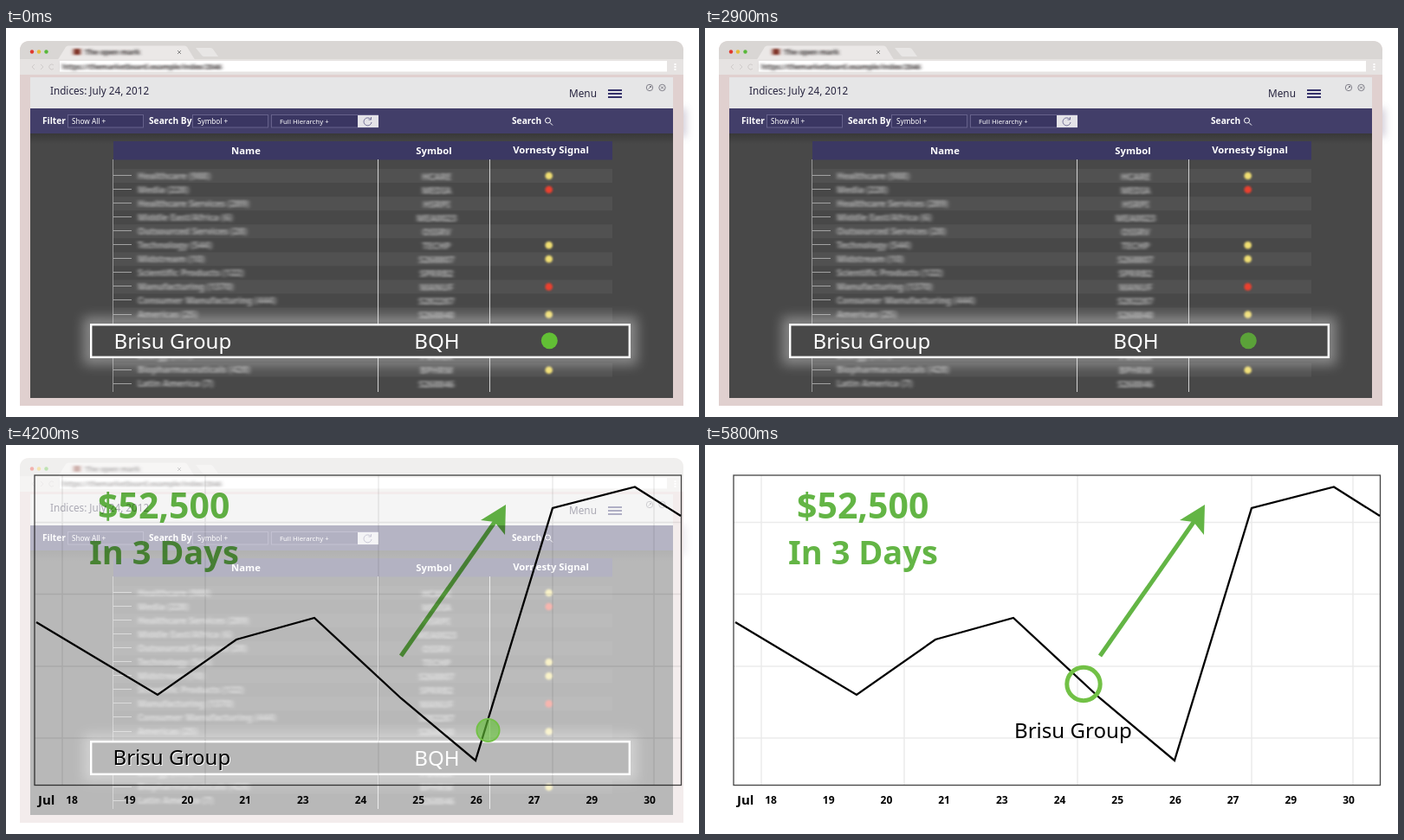
Animation of 800x450 px, one loop 5.9 s. Source, as an HTML page:

```html
<!DOCTYPE html>
<html lang="en">
<head>
<meta charset="utf-8">
<title>Signal to chart</title>
<style>
  html, body { margin: 0; width: 100%; height: 100%; overflow: hidden; background: #fff; }
  svg { display: block; width: 800px; height: 450px; font-family: "Noto Sans", "Open Sans", sans-serif; }
  #chart { mix-blend-mode: multiply; }
  .bold { font-weight: 700; }
  .semi { font-weight: 600; }
  .mid { text-anchor: middle; }
  .line { fill: none; }
</style>
</head>
<body>
<svg viewBox="0 0 800 450">
  <defs>
    <filter id="smear" x="-10%" y="-10%" width="120%" height="120%"><feGaussianBlur stdDeviation="2 0.8"/></filter>
    <filter id="soft" x="-50%" y="-50%" width="200%" height="200%"><feGaussianBlur stdDeviation="1"/></filter>
    <filter id="glow" filterUnits="userSpaceOnUse" x="50" y="290" width="720" height="140"><feGaussianBlur stdDeviation="7"/></filter>
    <filter id="shade" filterUnits="userSpaceOnUse" x="740" y="70" width="60" height="80"><feGaussianBlur stdDeviation="5"/></filter>
    <filter id="motion" x="-20%" y="-20%" width="140%" height="140%"><feGaussianBlur id="motionBlur" stdDeviation="0 0"/></filter>
    <linearGradient id="fall" x2="0" y2="1">
      <stop stop-color="#000" stop-opacity=".22"/><stop offset="1" stop-color="#000" stop-opacity="0"/>
    </linearGradient>
    <clipPath id="pane"><rect x="28" y="57" width="742" height="371"/></clipPath>
  </defs>
  <rect width="800" height="450" fill="#fff"/>

  <g id="board">
    <!-- browser window -->
    <rect x="768" y="93" width="17" height="33" fill="#6a5a80" opacity=".3" filter="url(#shade)"/>
    <path d="M16 437V27Q16 15 28 15H770Q782 15 782 27V437Z" fill="#e0d0cf"/>
    <path d="M16 36V27Q16 15 28 15H770Q782 15 782 27V36Z" fill="#d9d6d4"/>
    <rect x="16" y="36" width="766" height="18" fill="#e6e3e2"/>
    <circle cx="30" cy="27.5" r="2.2" fill="#df3a2e"/>
    <circle cx="38" cy="27.5" r="2.2" fill="#e5bd35"/>
    <circle cx="46.500" cy="27.5" r="2.2" fill="#58b83a"/>
    <path d="M60 36.500L69 22Q70 20.500 72 20.500H206Q208 20.500 209 22L218 36.500Z" fill="#ebe8e7"/>
    <path d="M219 23H236Q238 23 239 24.500L245 33H229Q227 33 226 31.500Z" fill="#e8e6e5"/>
    <path class="line" d="M198 26l4 4m0-4l-4 4" stroke="#888"/>
    <path class="line" d="M33 42l-3 3 3 3M40 42l3 3-3 3M55 43a3 3 0 1 0 0 4" stroke="#cfcbca"/>
    <rect x="62" y="38" width="701" height="12.500" fill="#fff"/>
    <path d="M772.500 41v8" stroke="#fff" stroke-width="2" stroke-dasharray="2 1"/>
    <g filter="url(#smear)" fill="#3c3636">
      <rect x="78" y="24" width="8" height="7" fill="#7a2a1c"/>
      <text class="bold" x="91" y="31" font-size="8.500">The open mark</text>
      <text class="bold" x="65" y="48" font-size="8.200">https://themarketboard.example/index/2046</text>
    </g>

    <!-- page header -->
    <rect x="28" y="57" width="742" height="36" fill="#e6e6e7"/>
    <rect x="28" y="93" width="742" height="335" fill="#484848"/>
    <rect x="28" y="122" width="742" height="12" fill="url(#fall)"/>
    <rect x="28" y="93" width="742" height="29" fill="#423e69"/>
    <g fill="#27243f">
      <text x="51" y="77" font-size="11.700">Indices: July 24, 2012</text>
      <text x="650" y="80" font-size="11.800">Menu</text>
    </g>
    <path d="M695 72h16m-16 4h16m-16 4h16" stroke="#35316a" stroke-width="2"/>
    <g class="line" stroke="#77757f" stroke-width=".9">
      <circle cx="743" cy="69" r="3.700"/><circle cx="757.500" cy="69" r="3.700"/>
      <path d="M741.500 70.500l3-3m-1.500 0h1.500v1.500M756 67.500l3 3m0-3l-3 3"/>
    </g>
    <g fill="#3a3662" stroke="#6a6690" stroke-width=".9">
      <rect x="71.500" y="100.500" width="87" height="14.500"/>
      <rect x="215.500" y="100.500" width="87" height="14.500"/>
      <rect x="306.500" y="100.500" width="123" height="14.500"/>
    </g>
    <rect x="406" y="101" width="24" height="14" fill="#e4e3e8"/>
    <path class="line" d="M421 105.500a4.500 4.500 0 1 0 1 3.500M421.500 103v3h-3" stroke="#77749a"/>
    <g fill="#fff">
      <g class="semi" font-size="10.200">
        <text x="42" y="111">Filter</text>
        <text x="165" y="111">Search By</text>
        <text x="584" y="111">Search</text>
      </g>
      <g font-size="8.200">
        <text x="76" y="110.500">Show All +</text>
        <text x="221" y="110.500">Symbol +</text>
        <text x="316" y="110.500" font-size="7.800">Full Hierarchy +</text>
      </g>
    </g>
    <path class="line" d="M628 109.500l3 3M628.500 107a3 3 0 1 0-6 0a3 3 0 1 0 6 0" stroke="#fff"/>

    <!-- table -->
    <g id="stripes" fill="#515151"></g>
    <rect x="124" y="131" width="576" height="21.500" fill="#3b3863"/>
    <g class="bold mid" fill="#fff" font-size="11.300">
      <text x="277" y="146">Name</text>
      <text x="494" y="146">Symbol</text>
      <text x="629" y="145">Vornesty Signal</text>
    </g>
    <path d="M123.500 152V421" stroke="#979797"/>
    <path d="M429.500 152V421M558.500 152V421" stroke="#d2d2d2"/>
    <g id="dashes" stroke="#a2a2a2"></g>
    <g id="rows" class="semi" fill="#b4b4b4" font-size="10.300" filter="url(#smear)"></g>
    <g id="lights" filter="url(#soft)"></g>

    <!-- picked row -->
    <g clip-path="url(#pane)">
      <rect x="98" y="343" width="622" height="38" class="line" stroke="#fff" stroke-width="17" opacity=".36" filter="url(#glow)"/>
    </g>
    <rect x="98.200" y="343.200" width="621.600" height="37.600" fill="#484848" stroke="#fff" stroke-width="2.400"/>
    <g fill="#fff" font-size="24.100">
      <text x="124.500" y="370.500">Brisu Group</text>
      <text class="mid" x="497.500" y="370.500">BQH</text>
    </g>
  </g>

  <g id="chart">
    <path class="line" d="M65 35V393M230 35V393M430 35V393M631 35V393M748 35V393M33 89.500H779M33 172.500H779M33 256H779M33 339H779" stroke="#ebebeb" stroke-width="1.500"/>
    <rect class="line" x="33" y="35" width="746.500" height="358.500" stroke="#444" stroke-width="1.300"/>
    <polyline class="line" points="35,205 175,289 266,225 356,200 456,293 542,365 631,73 726,48.500 779,82" stroke="#000" stroke-width="2.300"/>
    <g fill="#63b545" class="bold">
      <text x="106" y="85" font-size="41">$52,500</text>
      <text x="96" y="138" font-size="38">In 3 Days</text>
      <path d="M577 69L548 87L564 89L576 104Z"/>
    </g>
    <path d="M456 244L567 85" stroke="#63b545" stroke-width="5"/>
    <text class="semi" x="37" y="416" font-size="15">Jul</text>
    <g id="days" class="semi mid" font-size="12"></g>
  </g>

  <text id="label" font-size="24.100">Brisu Group</text>
  <circle id="dot" fill="#62bf35" stroke="#72c146"/>
</svg>

<script>
const LOOP = 5900, STEP = 100;
const $ = id => document.getElementById(id);

function add(parent, tag, attrs, text = "") {
  const el = document.createElementNS("http://www.w3.org/2000/svg", tag);
  set(el, attrs);
  el.textContent = text;
  return $(parent).appendChild(el);
}
function set(el, attrs) {
  for (const key in attrs) el.setAttribute(key, attrs[key]);
}

// name, symbol, signal light (y = yellow, r = red)
const table = [
  ["Healthcare (988)", "HCARE", "y"],
  ["Media (228)", "MEDIA", "r"],
  ["Healthcare Services (289)", "HSRPI"],
  ["Middle East/Africa (6)", "MEA0023"],
  ["Outsourced Services (28)", "OSSRV"],
  ["Technology (544)", "TECHP", "y"],
  ["Midstream (10)", "S268807", "y"],
  ["Scientific Products (122)", "SPRRB2"],
  ["Manufacturing (1370)", "MANUF", "r"],
  ["Consumer Manufacturing (444)", "S282287"],
  ["Americas (25)", "S268840", "y"],
  ["Medical Facilities (82)", "MEDFC"],
  null,
  ["Energy (417)", "POWER"],
  ["Biopharmaceuticals (428)", "BPHRM", "y"],
  ["Latin America (7)", "S268846"]
];
const lightColor = { y: "#f0de72", r: "#ea3f2d" };

table.forEach((row, i) => {
  const y = 171 + i * 16.05;
  if (i % 2 === 0) add("stripes", "rect", { x: 124, y: y - 8, width: 576, height: 16 });
  if (!row) return;
  const [name, symbol, light] = row;
  add("dashes", "path", { d: `M124 ${Math.round(y) - .5}H145` });
  add("rows", "text", { x: 152, y: y + 3.5 }, name);
  add("rows", "text", { x: 497, y: y + 4.5, class: "mid" }, symbol);
  if (light) add("lights", "circle", { cx: 626.7, cy: y, r: 4.3, fill: lightColor[light] });
});
for (let d = 18; d <= 30; d++) {
  if (d > 28 && d < 29) continue;
}
"18 19 20 21 22 24 25 26 27 29 30".replace("22", "23").split(" ").forEach((day, i) =>
  add("days", "text", { x: 76 + i * 66.7, y: 415 }, day === "23" ? "23" : day));

const clamp = x => Math.min(1, Math.max(0, x));
const ramp = (t, from, to) => clamp((t - from) / (to - from));
const mix = (a, b, p) => a + (b - a) * p;

// constant speed with a short run-up and run-out, each a share k of the time
function glide(x, k) {
  const v = 1 / (1 - k);
  if (x < k) return v * x * x / (2 * k);
  if (x > 1 - k) return 1 - v * (1 - x) ** 2 / (2 * k);
  return v * (x - k / 2);
}

function pulse(t) {
  if (t > 3312) return mix(.22, 1, ramp(t, 3312, 3750));
  return mix(.22, 1, .5 + .5 * Math.cos(2 * Math.PI * t / 1325));
}

function draw(t) {
  const ink = ramp(t, 3700, 4180);
  $("board").style.opacity = 1 - ramp(t, 3720, 4500);
  $("chart").style.opacity = ink;

  const p = glide(ramp(t, 3645, 5030), .224);
  set($("dot"), {
    cx: mix(627.3, 437, p), cy: mix(361.7, 276.5, p), r: mix(9.5, 19.2, p),
    "fill-opacity": 1 - p, "stroke-width": 5 * p, opacity: pulse(t)
  });

  const x = ramp(t, 4200, 4870), q = x * x * (3 - 2 * x);
  const blur = 12 * x * (1 - x);
  set($("label"), {
    x: mix(123.5, 357, q), y: mix(370, 339, q), opacity: ink,
    filter: blur > 0 ? "url(#motion)" : "none"
  });
  set($("motionBlur"), { stdDeviation: `${blur} 0` });
}

const start = performance.now();
function tick() {
  const t = (performance.now() - start) % LOOP;
  draw(Math.floor(t / STEP) * STEP);
  requestAnimationFrame(tick);
}
draw(0);
requestAnimationFrame(tick);
</script>
</body>
</html>
```
